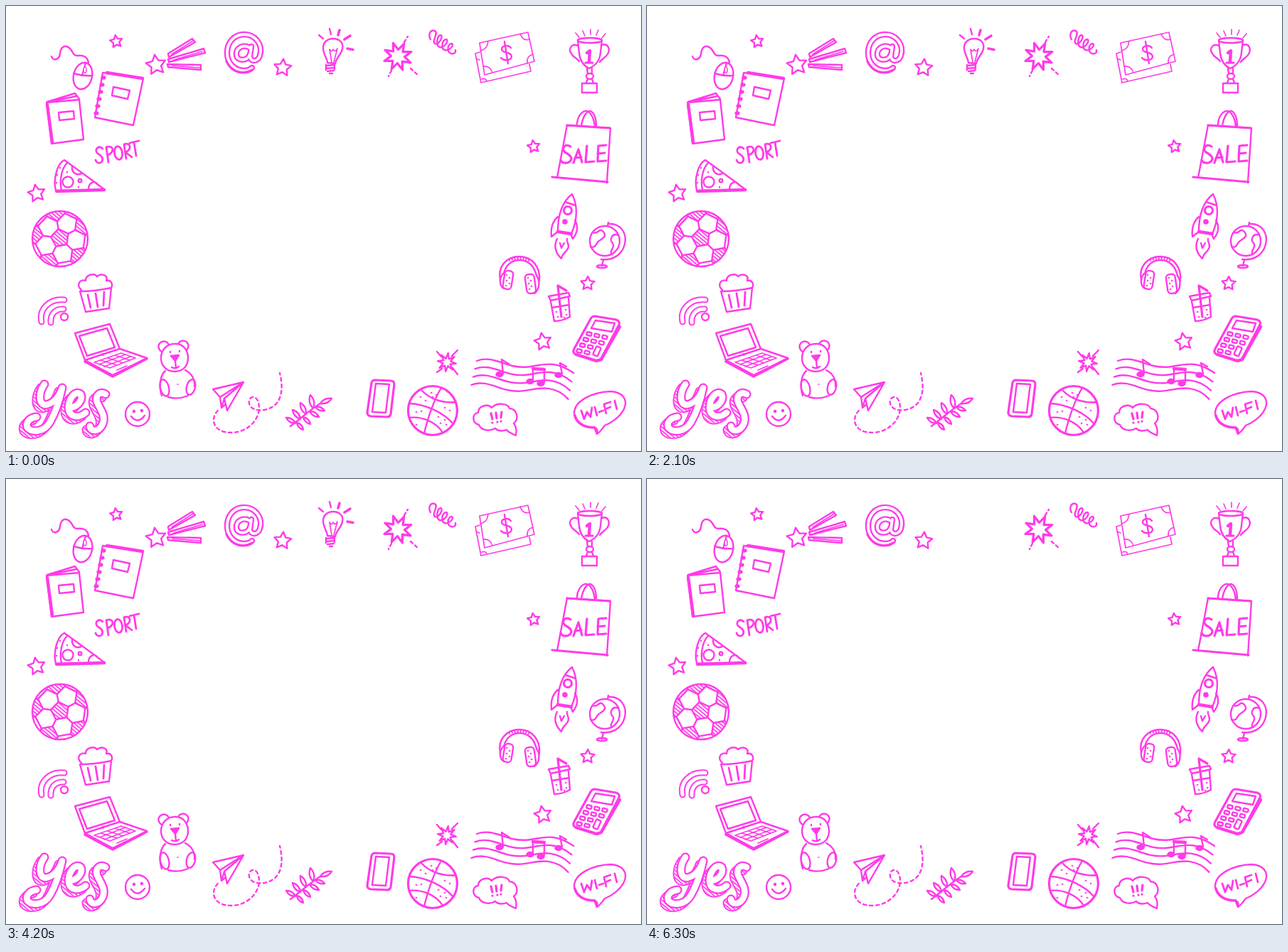
These frames come from a looping animation (893x627 px, 7000 ms). An HTML page:

```html
<!DOCTYPE html>
<html lang="en">
<head>
<meta charset="utf-8">
<title>Doodle frame</title>
<style>
  html, body { margin: 0; width: 100%; height: 100%; overflow: hidden; background: #fff; }
  svg { display: block; width: 893px; height: 627px; --ink: #ff3be8; }
  svg, .line { fill: none; stroke: var(--ink); stroke-width: 2.4; stroke-linecap: round; stroke-linejoin: round; }
  .thin { stroke-width: 1.7; }
  .bold { stroke-width: 3.2; }
  .heavy { stroke-width: 4.4; }
  .solid { fill: var(--ink); }
  .paper { fill: #fff; }
  .hatched { fill: url(#hatch); }
  .blink { animation: 7s step-end infinite; }
  #yes { animation-name: yes; }
  #music { animation-name: music; }
  #bulb { animation-name: bulb; }
  @keyframes yes { 0%, 20% { opacity: 1 } 10% { opacity: 0 } }
  @keyframes music { 0%, 80% { opacity: 1 } 70% { opacity: 0 } }
  @keyframes bulb { 0% { opacity: 1 } 90%, 100% { opacity: 0 } }
</style>
</head>
<body>
<svg viewBox="0 0 893 627" id="stage">
  <defs>
    <pattern id="hatch" width="4" height="4" patternUnits="userSpaceOnUse" patternTransform="rotate(40)">
      <path d="M0 2H4" stroke-width="1.8" stroke-linecap="butt"/>
    </pattern>
    <path id="yesPath" d="M54 533C46 544 45 562 56 562C67 560 75 550 79 538C75 556 69 574 62 586C54 600 37 602 30 594C27 586 34 580 43 579M89 566C99 566 109 556 105 547C98 541 89 552 88 564C87 579 101 582 112 573M140 547C133 542 125 548 128 558C132 568 141 577 136 589C131 600 119 601 118 592"/>
    <path id="atPath" d="M345 57L343 71C344 79 354 79 357 70C362 54 350 40 335 40C321 40 311 51 311 66C311 81 322 91 335 91C340 91 344 89 346 87M343 68C340 78 325 78 324 69C323 59 334 53 343 59"/>
    <path id="wifiPath" d="M50 445C46 427 61 412 82 414M63 446C62 434 70 426 81 427"/>
  </defs>

  <g id="mouse">
    <path d="M64 71C66 78 75 76 76 67C77 58 82 54 89 59C95 64 93 70 101 70C109 69 115 72 116 80"/>
    <ellipse cx="108" cy="98.500" rx="13" ry="19" transform="rotate(13 108 98.500)"/>
    <path d="M95 95Q108 99 121 98M112 80L107 98"/>
    <ellipse cx="111" cy="90" rx="2" ry="4" class="paper" stroke-width="1.500"/>
  </g>

  <g id="notebook">
    <path d="M136 94L193 102L179 168L125 157Z"/>
    <path class="heavy" d="M142 94L192 102"/>
    <path d="M151 114L174 119L171 131L149 126Z"/>
  </g>

  <g id="book">
    <path d="M57 136L103 132L109 188L64 194Z"/>
    <path class="heavy" d="M58 139L65 192"/>
    <path d="M58 135L97 123L103 131M66 134L99 127M74 150L95 148L96 159L75 161Z"/>
  </g>

  <g id="rays">
    <path d="M228 67L262 46L266 51L229 72ZM228 75L278 60L280 66L229 79ZM227 82L274 83L274 90L228 86Z"/>
    <path class="thin" d="M233 68L263 49M236 76L276 64M234 84L273 87"/>
  </g>

  <g id="at">
    <use href="#atPath" stroke-width="8.500"/>
    <use href="#atPath" stroke-width="3.800" stroke="#fff"/>
    <path class="bold" d="M310 78C317 93 333 98 346 90"/>
  </g>

  <g id="bulb" class="blink">
    <path d="M452 80C452 74 446 68 446 59C446 51 452 46 460 46C469 46 475 52 473 60C472 68 464 73 463 81Z"/>
    <path class="thin" d="M458 79L455 61Q458 66 460 61Q463 66 466 60L461 79"/>
    <path d="M450 84L462 83M450 88L462 87M452 92L461 91M455 95H459M450 83V90M462 82V89"/>
    <path d="M455 32L457 40M440 41L446 46"/>
    <path d="M469 34L467 41M484 42L476 47M480 60L488 61.500" stroke-width="3.600"/>
  </g>

  <g id="explosion">
    <path d="M560 51L565 43M569 88L579 97M542 91L538 99" stroke-dasharray="4 4"/>
  </g>

  <path id="spring" d="M597 47C593 40 597 33 603 35C609 38 598 50 603 53C609 55 616 42 611 41C606 42 604 56 610 58C616 60 624 48 619 47C613 48 611 60 617 62C623 64 631 55 627 53C621 53 619 65 626 67C630 68 633 66 632 62"/>

  <g id="money">
    <path class="thin" d="M666 52L734 37L743 78L673 97ZM666 65L660 67L668 108L738 92L736 82M667 63Q677 61 678 50M723 39Q727 50 736 47M733 81Q732 70 741 68M671 85Q681 84 684 94M661 74L666 76M669 103Q675 101 676 106"/>
    <path d="M710 59C706 54 697 56 697 61C697 67 711 64 711 71C711 77 700 78 696 73M701 50L706 81"/>
  </g>

  <g id="trophy">
    <ellipse cx="821" cy="48.500" rx="17" ry="3.500"/>
    <path d="M804 48L806 66C807 76 812 84 820 88C829 84 835 76 836 66L838 48M804 56C796 52 790 60 795 67C797 72 803 73 806 78M838 55C847 52 850 61 846 68C843 73 838 74 835 79M817 88L818 95M824 88V95M818 103L816 108M824 103L826 108M810 109H831V122H810Z"/>
    <ellipse cx="821" cy="99" rx="5" ry="4"/>
    <path class="heavy" d="M817 66L821 63L820 79"/>
    <path class="bold" d="M815 80H825"/>
    <path class="thin" d="M801 38L806 44M811 35L814 42M822 33V40M833 34L830 41M843 39L838 45"/>
  </g>

  <g id="bag" role="img" aria-label="SALE">
    <path d="M789 168L775 242M789 168L850 172L845 249M803 168C803 156 810 147 817 148C824 151 827 161 828 170M809 169C811 156 817 147 822 148C828 151 830 161 830 170"/>
    <path class="bold" d="M768 241L846 248M789 168L849 172"/>
    <path class="bold" d="M794 198C787 193 780 200 786 206C793 210 798 214 793 219C788 223 781 221 780 217M798 221L805 202L810 220M800 214L809 213M817 197L815 220L827 219M844 196L833 197L832 219L844 218M832 208L842 207"/>
  </g>

  <g id="rocket">
    <path d="M796 265C782 276 776 294 776 318L795 321C804 300 804 281 796 265ZM786 276L801 281M776 297C768 304 766 315 767 325L776 318M800 302C805 310 804 319 797 328L794 321M775 328C770 338 773 348 781 356C782 348 790 346 791 339C791 333 788 332 789 328M779 334L781 341L785 334"/>
    <path class="heavy" d="M776 318L795 321"/>
    <circle class="bold" cx="790" cy="288" r="5.500"/>
    <circle class="solid" cx="786" cy="304" r="2.600"/>
  </g>

  <g id="globe">
    <circle cx="842" cy="331" r="21"/>
    <path d="M847 305L846 310M848 307C864 306 874 320 870 336C866 351 853 359 837 357M840 358L838 366"/>
    <ellipse cx="838" cy="367" rx="7" ry="2"/>
    <path d="M825 319C833 323 834 311 840 318C846 325 838 328 834 331C829 334 830 342 822 339M861 323C852 319 848 330 853 334C858 340 847 345 852 350"/>
  </g>

  <g id="headphones">
    <path d="M695 386C691 367 704 353 722 353C740 353 752 368 750 387M700 377C703 364 712 358 722 358C734 358 743 366 746 380"/>
    <path d="M707 358C716 354 729 354 737 359" stroke-width="4" stroke-dasharray="2 2" stroke-linecap="butt"/>
    <rect x="700" y="373" width="12" height="26" rx="5" transform="rotate(9 706 386)"/>
    <rect x="731" y="378" width="13" height="27" rx="5" transform="rotate(-8 737 391)"/>
    <path d="M699 377C693 384 694 395 700 398M746 380C752 388 750 400 743 405"/>
  </g>

  <g id="drink">
    <path d="M763 409L791 404L793 409L766 415ZM766 416L771 444Q782 444 793 438L791 411M768 425L792 421"/>
    <path class="bold" d="M788 401L776 394L781 438"/>
  </g>

  <g id="calculator">
    <path class="bold" d="M828 437L858 442Q864 444 862 449L838 495Q835 501 830 500L801 491Q796 488 799 483L822 441Q824 437 828 437Z"/>
    <path class="heavy" d="M863 452L837 498L830 500L802 491"/>
    <path d="M829 443L856 447L852 459L823 454Z"/>
  </g>

  <g id="music" class="blink">
    <path class="heavy" d="M741 511L757 512"/>
    <path d="M699 518L697 498L708 505M741 528V511M757 530V512M782 518L779 503L788 508"/>
    <g class="solid">
      <ellipse cx="694" cy="519" rx="4.500" ry="3"/>
      <ellipse cx="737" cy="529" rx="4.500" ry="3"/>
      <ellipse cx="752" cy="532" rx="4.500" ry="3"/>
      <ellipse cx="777" cy="520" rx="4.500" ry="3"/>
    </g>
  </g>

  <g id="cloud">
    <path d="M665 590C655 588 655 574 664 573C664 563 678 560 683 566C690 558 706 560 708 567C719 568 722 582 714 588C718 593 718 600 717 605C713 603 706 601 704 597C697 600 690 598 688 595C680 600 668 598 665 590Z"/>
    <path class="bold" d="M682 574L684 582M689 573L690 581M697 572L696 580M684 587V587.200M691 586V586.200M696 585V585.200"/>
  </g>

  <g id="bubble" role="img" aria-label="WI-FI">
    <path d="M828 594C814 595 800 588 799 574C799 556 825 544 850 543C868 544 875 555 869 568C863 580 850 588 842 591C838 596 836 600 831 603C832 598 832 596 828 594Z"/>
    <path d="M800 577C803 589 815 594 828 594L831 602" stroke-width="3.500"/>
    <path stroke-width="2.800" d="M809 570L813 582L817 572L822 579L824 566M828 565L831 577M834 572L840 570M844 574L841 561L850 558M843 568L850 565M856 556L859 568"/>
  </g>

  <g id="phone">
    <path class="bold" d="M519 527L541 528Q546 528 546 533L541 575Q540 579 536 579L513 578Q508 577 508 573L514 531Q515 527 519 527Z"/>
    <path d="M520 532L539 533L534 573L515 572Z"/>
  </g>

  <g id="basketball">
    <circle class="bold" cx="600" cy="570" r="34.500"/>
    <path d="M567 560C590 561 616 573 629 589M612 538C602 555 593 582 588 602M583 540C597 556 618 560 633 558M567 580C585 578 605 586 614 601"/>
  </g>

  <g id="plane">
    <path d="M291 540L334 530L301 551ZM334 530L311 570L307 553ZM301 551L303 566L307 553M303 566L309 561"/>
    <path d="M298 570C286 582 292 602 318 601C345 600 362 575 354 556C350 547 340 551 342 560C345 574 372 572 382 558C390 545 388 530 385 517" stroke-dasharray="4.500 4.500"/>
  </g>

  <g id="bear">
    <circle cx="222" cy="480" r="7.500"/><circle cx="249" cy="479" r="7.500"/>
    <path class="paper" d="M237 476C249 475 256 485 256 496C256 508 248 515 237 515C226 515 218 507 218 496C218 485 226 476 237 476Z"/>
    <path class="solid" d="M232 493L243 492L238 500Z"/>
    <path d="M238 500L239 510M233 509Q238 512 243 508M231 487V488M244 486V487M224 514C216 521 215 538 219 549M252 513C262 518 266 527 265 536M228 551Q242 555 256 549"/>
    <ellipse cx="223" cy="538" rx="6" ry="12" transform="rotate(-14 223 538)"/>
    <ellipse cx="260" cy="537" rx="6" ry="11" transform="rotate(14 260 537)"/>
    <path class="thin" d="M241 533H242"/>
  </g>

  <g id="laptop">
    <path d="M97 461L146 448L160 483L111 499ZM103 465L142 454L153 481L114 493ZM160 483L198 496L150 520L111 499"/>
    <path d="M111 501L150 522L198 497" stroke-width="3.600"/>
    <path class="thin" d="M124 502L162 489L182 496L146 510ZM131 505L168 491M138 508L175 494M133 499L156 506M143 496L165 503M153 492L174 499M156 513L170 507"/>
    <circle cx="136" cy="491" r=".8"/>
  </g>

  <g id="smiley">
    <circle cx="185" cy="575" r="17"/>
    <path d="M176 578Q185 590 195 577"/>
    <path class="heavy" d="M180 571V571.200M191 570V570.200"/>
  </g>

  <g id="yes" class="blink" role="img" aria-label="yes">
    <g transform="translate(-5 5)">
      <use href="#yesPath" stroke-width="13"/>
      <use href="#yesPath" stroke-width="9" stroke="#fff"/>
      <use href="#yesPath" stroke-width="9" stroke="url(#hatch)"/>
    </g>
    <use href="#yesPath" stroke-width="13"/>
    <use href="#yesPath" stroke-width="8.500" stroke="#fff"/>
  </g>

  <g id="wifi">
    <use href="#wifiPath" stroke-width="9"/>
    <use href="#wifiPath" stroke-width="5" stroke="#fff"/>
    <circle cx="82" cy="438" r="5"/>
  </g>

  <g id="popcorn">
    <path d="M104 402L112 431L145 426L148 397M104 402Q126 402 148 397M106 400C98 393 104 384 112 387C112 378 124 376 128 381C134 376 144 379 141 387C149 385 151 394 147 398"/>
    <path d="M115 407L119 425M126 405L129 424M138 403L137 422" stroke-width="2.800"/>
  </g>

  <g id="pizza">
    <path d="M82 217C72 222 66 244 70 260L139 259C122 246 100 230 82 217ZM86 221C78 229 75 246 78 259M93 226C92 236 101 240 107 235M116 258C116 248 126 245 129 252"/>
    <path class="heavy" d="M71 261L138 259"/>
    <circle cx="87" cy="248" r="7.500"/>
    <circle cx="104" cy="246" r="2.300"/>
    <path d="M76 228V228.200M72 238V238.200M71 249V249.200M86 234V234.200M102 255V255.200"/>
  </g>

  <g id="sport" role="img" aria-label="SPORT" stroke-width="2.800">
    <path d="M136 201C131 196 124 201 128 207C132 210 138 213 135 219C132 223 127 221 126 217M141 199L144 220M141 199C152 195 153 207 143 210M166 195L169 215M166 195C176 191 177 203 168 206L177 213M174 193L187 190M180 192L183 211"/>
    <ellipse cx="158" cy="207" rx="5.500" ry="9.500" transform="rotate(-8 158 207)"/>
  </g>

  <g id="ball"><clipPath id="ballClip"><circle cx="76" cy="328" r="39"/></clipPath></g>
</svg>
<script>
  const byId = id => document.getElementById(id);
  const stage = byId('stage');

  function add(parent, tag, attrs) {
    const node = document.createElementNS('http://www.w3.org/2000/svg', tag);
    for (const key in attrs) node.setAttribute(key, attrs[key]);
    return parent.appendChild(node);
  }
  const path = (parent, d, cls = 'line') => add(parent, 'path', { d, class: cls });
  const polar = (x, y, r, deg) => [x + r * Math.cos(deg * Math.PI / 180), y + r * Math.sin(deg * Math.PI / 180)];
  const closed = points => 'M' + points.map(p => p.map(v => v.toFixed(1)).join(' ')).join('L') + 'Z';
  const spikes = (x, y, n, outer, inner, turn) =>
    closed(Array.from({ length: 2 * n }, (_, i) => polar(x, y, i % 2 ? inner : outer, turn + i * 180 / n)));
  const dots = (id, points, r) => points.forEach(([cx, cy]) =>
    add(byId(id), 'circle', { cx, cy, r, class: 'solid', 'stroke-width': .6 }));

  // Five-pointed stars: x, y, radius, turn
  [[155, 50, 9, -98], [211, 83, 14.5, -98], [389, 87, 12.5, -85], [43, 264, 12.5, -100],
   [742, 198, 9, -98], [818, 391, 10, -88], [755, 473, 12.5, -100]]
    .forEach(([x, y, r, turn]) => path(stage, spikes(x, y, 5, r, r * .5, turn), 'line paper'));

  // Bursts
  path(byId('explosion'), spikes(551, 71, 8, 20, 9.5, -64), 'bold paper');
  path(stage, spikes(620, 502, 8, 13, 5.5, -82));
  path(stage, 'M627 493L635 485M612 494L606 487M628 510L635 519M613 511L606 516');

  // Notebook rings
  for (let i = 0; i < 6; i++)
    add(byId('notebook'), 'ellipse', { cx: 137 - i * 2, cy: 101 + i * 10, rx: 2.4, ry: 1.6, class: 'solid' });

  // Calculator keys
  for (let row = 0; row < 4; row++)
    for (let col = 0; col < 3; col++) {
      if (row === 3 && col === 2) continue;
      const x = 820 + col * 11 - row * 4.6, y = 462 + col * 2.3 + row * 8;
      const tall = row === 2 && col === 2;
      add(byId('calculator'), 'rect', {
        x: x - 3.5, y: y - 2.3, width: 7, height: tall ? 13 : 4.6, rx: 1.5,
        transform: `rotate(${tall ? 24 : 14} ${x} ${y})`
      });
    }

  // Staff lines
  for (let i = 0; i < 4; i++)
    path(byId('music'), `M${662 - i * 2.5} ${500 + i * 11.3}c18 -7 33 3 50 7c25 6 40 -5 58 -2c14 2 22 8 28 ${12 + i}`);

  // Branch
  const leaf = (x, y, dx, dy) =>
    `M${x} ${y}q${dx * .5 - dy * .32} ${dy * .5 + dx * .32} ${dx} ${dy}q${-dx * .5 + dy * .32} ${-dy * .5 - dx * .32} ${-dx} ${-dy}`;
  path(stage, 'M400 592C414 582 426 570 442 560'
    + leaf(442, 560, 16, -7) + leaf(407, 588, -13, -8) + leaf(414, 582, -11, -13)
    + leaf(422, 575, -8, -16) + leaf(432, 567, -4, -19)
    + leaf(409, 587, 9, 10) + leaf(418, 579, 10, 10) + leaf(427, 571, 13, 8) + leaf(435, 565, 13, 5));

  // Football panels
  const ball = byId('ball'), cx = 76, cy = 327;
  const panels = add(ball, 'g', { 'clip-path': 'url(#ballClip)' });
  const pentagon = (x, y, r, turn) => closed([0, 72, 144, 216, 288].map(a => polar(x, y, r, turn + a)));
  path(panels, pentagon(cx, cy, 13, -100), 'line hatched');
  for (let i = 0; i < 5; i++) {
    const a = -100 + i * 72, [x, y] = polar(cx, cy, 38, a);
    path(panels, pentagon(x, y, 14, a + 180), 'line hatched');
    path(panels, closed([polar(cx, cy, 13, a), polar(cx, cy, 24, a)]));
    path(panels, closed([polar(cx, cy, 35.5, a + 22), polar(cx, cy, 35.5, a + 50)]));
  }
  add(ball, 'circle', { cx: 76, cy: 328, r: 39 });

  dots('headphones', [[704, 379], [708, 383], [704, 387], [708, 391], [703, 394],
    [734, 383], [738, 387], [735, 391], [739, 395], [736, 399]], 1);
  dots('drink', [[774, 431], [787, 428], [776, 438], [788, 435], [785, 439]], 1);
  dots('basketball', [[598, 545], [605, 548], [600, 551], [583, 551], [590, 556], [577, 572], [584, 571],
    [577, 590], [608, 579], [617, 583], [611, 588], [619, 590], [617, 566], [624, 570]], 1);
</script>
</body>
</html>
```
